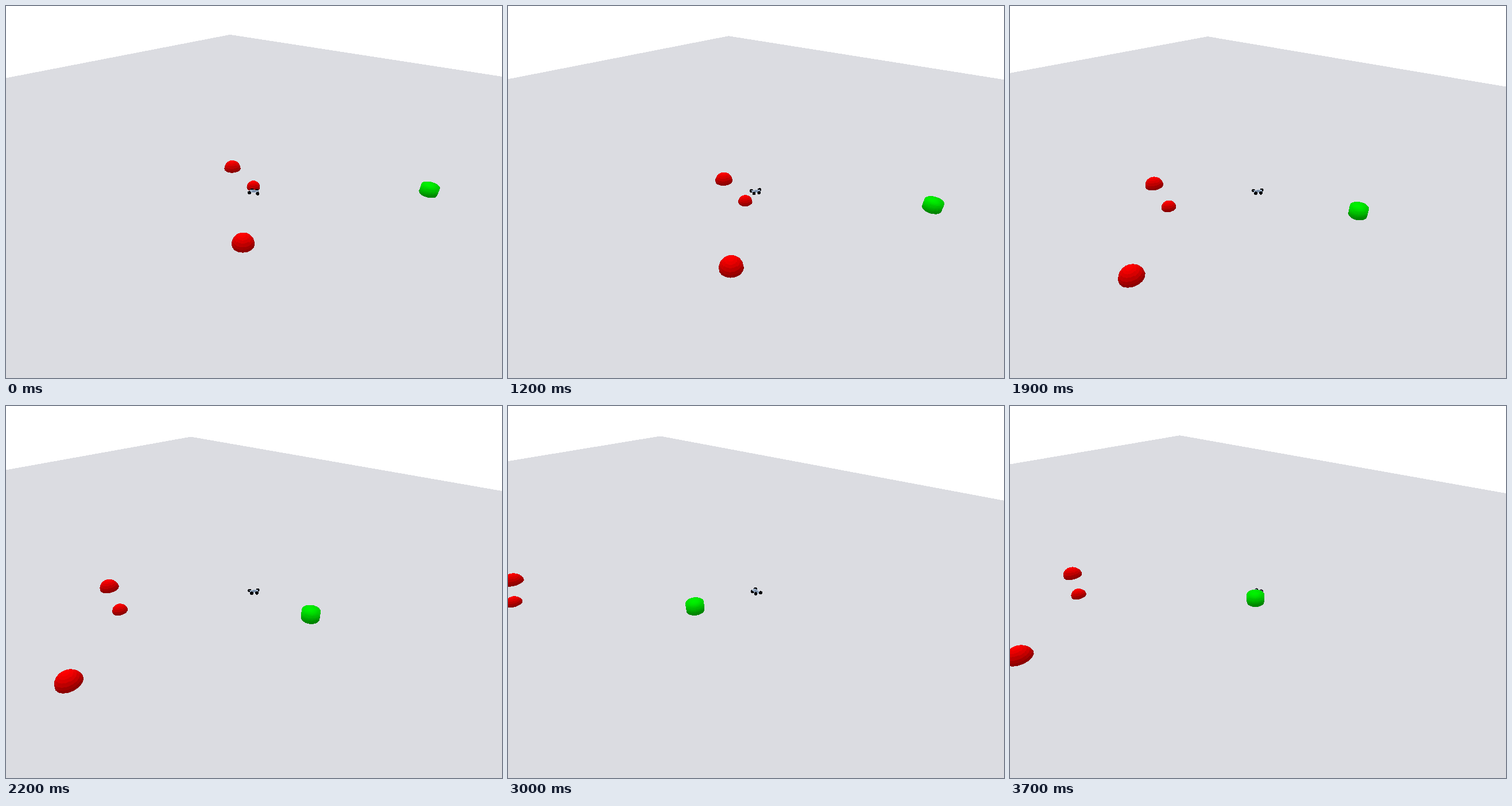
A matplotlib script for the animation above (3.8 s loop, 864 by 648 pixels).

```python
import numpy as np
import matplotlib.pyplot as plt
from matplotlib.animation import FuncAnimation
from matplotlib.collections import PolyCollection

W, H, DPI = 864, 648, 100
FRAMES, INTERVAL = 38, 100

# Camera: 60 degree field of view, pitched 35 degrees down, locked on the car.
FOCAL = H / 2 / np.tan(np.radians(30))
SIN, COS = np.sin(np.radians(35)), np.cos(np.radians(35))
DISTANCE = 10
HALF_GROUND = 19.85
YAW = np.radians(40)
LIGHT = np.array([-0.1, 0.22, 0.97])

GROUND = (219 / 255, 220 / 255, 225 / 255)
RED, GREEN = np.array([1, 0, 0]), np.array([0, 0.95, 0])
BODY, WINDOW, TYRE = (0.61, 0.69, 0.78), (0.47, 0.55, 0.65), (0.02, 0.02, 0.03)

# Waypoints of the drive: frame, x (right), y (away from the viewer).
ROUTE = np.array([
    (0, 0, 0), (6, -0.66, 0.14), (8, -0.53, 0.447), (12, 0.3, 0.78),
    (16, 1.478, 0.918), (22, 3.815, 1.205), (26, 5.7, 1.42),
    (30, 7.12, 0.84), (33, 7.7, -0.55), (37, 5.455, 0.446),
])
TIMES, POINTS = ROUTE[:, 0], ROUTE[:, 1:]
SLOPES = np.gradient(POINTS, TIMES, axis=0)


def car_position(t):
    """Cubic Hermite curve through the waypoints."""
    i = np.clip(np.searchsorted(TIMES, t, side="right") - 1, 0, len(TIMES) - 2)
    span = TIMES[i + 1] - TIMES[i]
    u = (t - TIMES[i]) / span
    x, y = ((2 * u**3 - 3 * u**2 + 1) * POINTS[i]
            + (u**3 - 2 * u**2 + u) * span * SLOPES[i]
            + (3 * u**2 - 2 * u**3) * POINTS[i + 1]
            + (u**3 - u**2) * span * SLOPES[i + 1])
    return np.array([x, y, 0])


def project(points):
    """Points relative to the car -> pixel positions and depth."""
    x, y, z = np.moveaxis(np.asarray(points, float), -1, 0)
    depth = DISTANCE + y * COS - z * SIN
    pixels = np.stack([W / 2 + FOCAL * x / depth,
                       H / 2 - FOCAL * (y * SIN + z * COS) / depth], -1)
    return pixels, depth


def lathe(r, z, tilt, segments, color):
    """Spin a profile with normals tilted up by `tilt` into shaded quads."""
    angle = np.linspace(0, 2 * np.pi, segments + 1)
    c, s = np.cos(angle), np.sin(angle)

    def spin(radius, height):
        radius, height = radius[:, None], height[:, None]
        return np.stack([radius * c, radius * s, height + 0 * c], -1)

    def corners(a):
        return np.stack([a[:-1, :-1], a[:-1, 1:], a[1:, 1:], a[1:, :-1]],
                        2).reshape(-1, 4, 3)

    normals = corners(spin(np.cos(tilt), np.sin(tilt))).mean(1)
    normals /= np.linalg.norm(normals, axis=1, keepdims=True)
    shade = 0.55 + 0.45 * np.clip(normals @ LIGHT, 0, 1)
    return corners(spin(r, z)), shade[:, None] * color


def dome(radius):
    lat = np.linspace(0, np.pi / 2, 7)
    return lathe(radius * np.cos(lat), radius * np.sin(lat), lat, 16, RED)


def drum(radius, height):
    """Smooth-shaded cylinder: normals turn steadily from side to top."""
    u = np.linspace(0, 2, 13)
    return lathe(radius * np.clip(2 - u, 0, 1), height * np.clip(u, 0, 1),
                 u * np.pi / 4, 28, GREEN)


OBJECTS = [
    ((-0.019, 0.262, 0), dome(0.2)),
    ((-0.746, 1.417, 0), dome(0.27)),
    ((-0.274, -2.292, 0), dome(0.285)),
    ((5.38, -0.05, 0), drum(0.25, 0.25)),
]


def ground_outline(car):
    a = np.array([np.sin(YAW), np.cos(YAW), 0])
    b = np.array([-np.cos(YAW), np.sin(YAW), 0])
    corner = HALF_GROUND * (a + b) - car
    edge, _ = project([corner - 36 * a, corner, corner - 36 * b])
    return np.vstack([edge, [(3 * W, 2 * H), (-2 * W, 2 * H)]])


def car_shapes(forward):
    left = np.array([-forward[1], forward[0], 0])

    def place(spots, z):
        return project([f * forward + s * left + (0, 0, z)
                        for f, s in spots])[0]

    def slab(length, width):
        return place([(length, width), (-length, width),
                      (-length, -width), (length, -width)], 0.03)

    ring = np.linspace(0, 2 * np.pi, 12, endpoint=False)
    disc = 2.4 * np.stack([np.cos(ring), np.sin(ring)], 1)
    spots = [(end * x, y) for x, y in ((0.13, 0.08), (0.08, -0.075))
             for end in (-1, 1)]
    wheels = [(disc + p, TYRE)
              for p in sorted(place(spots, 0.01), key=lambda p: p[1])]
    return (wheels[:2] + [(slab(0.12, 0.055), BODY), (slab(0.05, 0.025), WINDOW)]
            + wheels[2:])


def scene(t):
    car = car_position(t)
    velocity = car_position(t + 0.1) - car_position(t - 0.1)
    layers = [(0, car_shapes(velocity / np.linalg.norm(velocity)))]
    for position, (quads, colors) in OBJECTS:
        offset = position - car
        pixels, depth = project(quads + offset)
        order = np.argsort(-depth.mean(1))
        layers.append((offset[1], [(pixels[i], colors[i]) for i in order]))
    layers.sort(key=lambda layer: -layer[0])
    return [(ground_outline(car), GROUND)] + sum((s for _, s in layers), [])


fig = plt.figure(figsize=(W / DPI, H / DPI), dpi=DPI, facecolor="white")
ax = fig.add_axes([0, 0, 1, 1])
ax.set(xlim=(0, W), ylim=(H, 0))
ax.axis("off")
picture = PolyCollection([], linewidths=0, antialiaseds=False)
ax.add_collection(picture, autolim=False)


def draw(frame):
    outlines, colors = zip(*scene(frame))
    picture.set_verts(outlines)
    picture.set_facecolor([tuple(c) for c in colors])
    return (picture,)


animation = FuncAnimation(fig, draw, frames=FRAMES, interval=INTERVAL,
                          repeat=True, repeat_delay=0)
plt.show()
```
